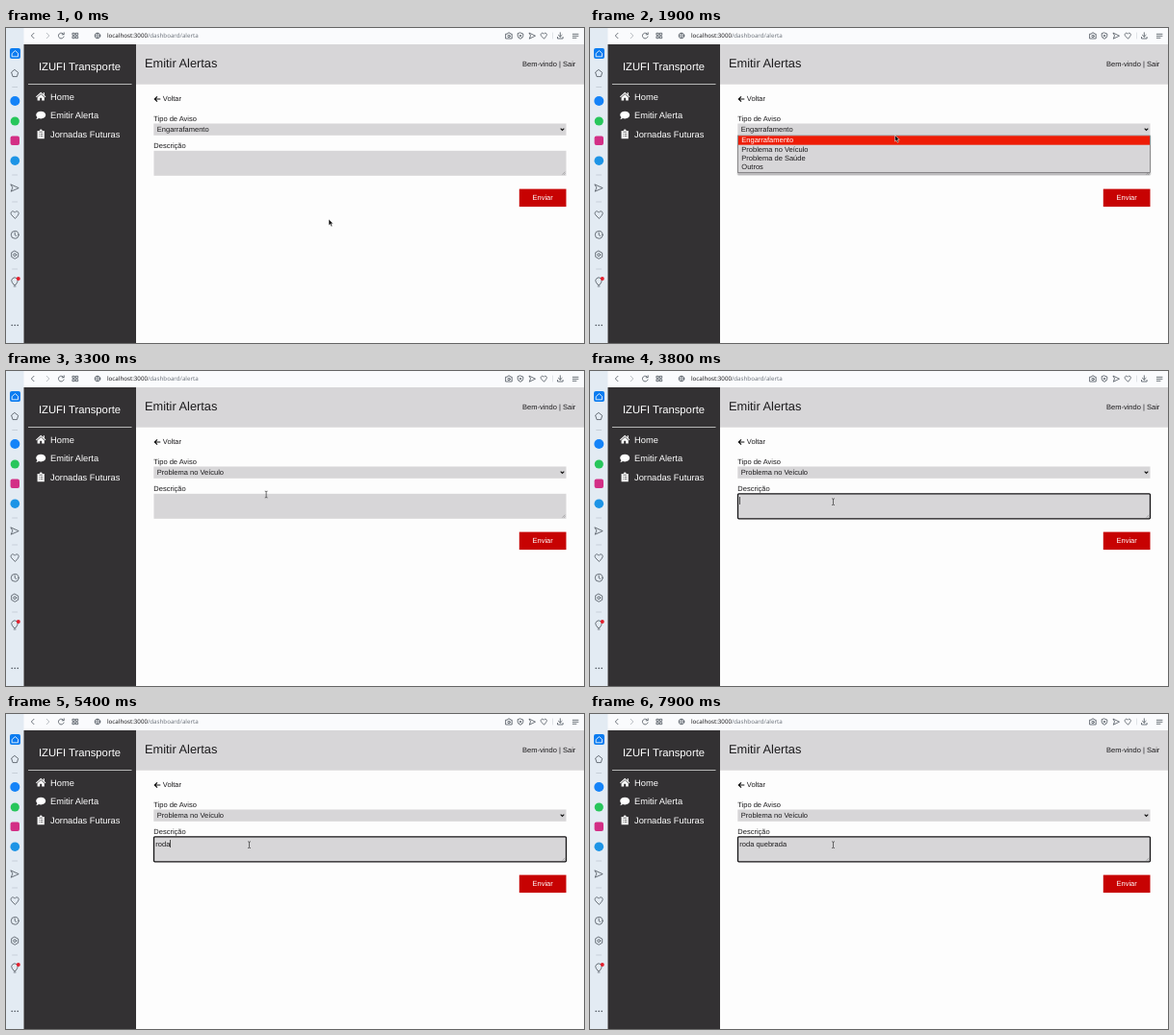
Animation, 600 px wide and 328 px high, one loop 8000 ms. Source, as an HTML page:

```html
<!DOCTYPE html>
<html lang="pt-BR">
<head>
<meta charset="utf-8">
<title>Emitir Alertas</title>
<style>
  html, body { margin: 0; width: 100%; height: 100%; overflow: hidden; background: #fdfdfd; }
  svg { display: block; }
  text { font: 7.5px "Liberation Sans", Arial, sans-serif; fill: #1c1b1d; white-space: pre; text-rendering: geometricPrecision; }
  .url { font: 6.2px "Noto Sans", sans-serif; }
  .title { font-size: 12.8px; }
  .brand { font-size: 11.25px; fill: #fff; text-anchor: middle; }
  .menu text { font-size: 9.3px; fill: #fff; }
  .line { fill: none; stroke: #4b525b; stroke-width: .8; stroke-linecap: round; stroke-linejoin: round; }
  .field { fill: #d7d6d8; }
</style>
</head>
<body>
<svg width="600" height="328" viewBox="0 0 600 328">
  <!-- browser toolbar -->
  <rect width="600" height="17" fill="#fafbfd"/>
  <g class="line">
    <path d="M29 5.3L26.3 8L29 10.7"/>
    <path d="M42.2 5.3L44.9 8L42.2 10.7" stroke="#a9aeb5"/>
    <path d="M59.8 6.5A2.9 2.9 0 1 0 60.1 9M60.2 4.8V6.8H58.2"/>
    <path d="M69.3 5.3h2v2h-2zM72.7 5.3h2v2h-2zM69.3 8.7h2v2h-2zM72.7 8.7h2v2h-2z"/>
    <circle cx="95" cy="8" r="2.8"/><path d="M92.2 8H97.8M95 5.2Q92.6 8 95 10.8Q97.4 8 95 5.2" stroke-width=".5"/>
    <path d="M519 6.2H520.5L521.2 5H523L523.7 6.2H525.2V11H519Z"/><circle cx="522.1" cy="8.5" r="1.2"/>
    <path d="M534 5L536.8 6V8.3Q536.5 10.3 534 11.3Q531.5 10.3 531.2 8.3V6Z"/><path d="M533 7.2L535 9.2M535 7.2L533 9.2"/>
    <path d="M543.3 5.2L549.5 8.2L543.3 11.2L544.4 8.2Z"/>
    <path d="M558.3 11L555.7 8.3C553.9 6.2 556.9 3.9 558.3 6.2C559.7 3.9 562.7 6.2 560.9 8.3Z"/>
    <path d="M567.5 5V11" stroke="#c9cdd2" stroke-width=".5"/>
    <path d="M575.3 4.8V9M573.5 7.4L575.3 9.1L577.1 7.4M572.5 9.5V11H578.1V9.5"/>
    <path d="M588.3 6.3H594M588.3 8.3H594M588.3 10.3H592"/>
  </g>
  <text class="url" x="105" y="10.3">localhost:3000<tspan fill="#70767e">/dashboard/alerta</tspan></text>

  <!-- browser sidebar -->
  <rect width="18.5" height="328" fill="#e3ebf3"/>
  <rect x="4" y="21" width="11" height="11" rx="2" fill="#0b7cf0"/>
  <path d="M6.5 26.3L9.5 23.6L12.5 26.3V29.8H6.5Z" class="line" style="stroke:#fff"/>
  <circle cx="9.3" cy="76" r="5" fill="#1483f8"/>
  <circle cx="9.3" cy="97" r="4.6" fill="#27c65b"/>
  <rect x="4.6" y="112.5" width="9.4" height="9.4" rx="2" fill="#d32f86"/>
  <circle cx="9.3" cy="138.2" r="4.8" fill="#1d94e6"/>
  <g class="line">
    <path d="M9.2 43.6L12.7 46.4L11.4 50.6H7L5.7 46.4Z"/>
    <path d="M6.7 61.5H11.7M6.7 153H11.7M6.7 181H11.7M6.7 251H11.7" stroke="#b4bdc7" stroke-width=".6"/>
    <path d="M5.2 163L13.2 166.6L5.2 170.2L6.7 166.6Z"/>
    <path d="M9.2 198.2L5.9 194.9C3.5 191.8 7.2 189.1 9.2 192.2C11.2 189.1 14.9 191.8 12.5 194.9Z"/>
    <circle cx="9.2" cy="215.3" r="3.9"/><path d="M9.2 213V215.5L10.8 216.5"/>
    <path d="M9.2 232.2L12.7 234.2V238.3L9.2 240.3L5.7 238.3V234.2Z"/><circle cx="9.2" cy="236.2" r="1.4"/>
    <path d="M8 267.2L6.3 264.8A3.2 3.2 0 1 1 11.7 264.8L10.2 267.2ZM8.2 269H10"/>
  </g>
  <circle cx="12.8" cy="261" r="2" fill="#e3202d"/>
  <g fill="#3c434b"><circle cx="6.2" cy="309.6" r=".75"/><circle cx="9.2" cy="309.6" r=".75"/><circle cx="12.2" cy="309.6" r=".75"/></g>

  <!-- page navigation -->
  <rect x="18.5" y="17" width="116.5" height="311" fill="#333133"/>
  <text class="brand" x="76.5" y="44">IZUFI Transporte</text>
  <path d="M23 58.5H130.5" stroke="#d8d8d8" stroke-width=".8"/>
  <g class="menu" fill="#fff">
    <path d="M31 71.6L36.2 66.8L41.4 71.6L40.7 72.3L36.2 68.2L31.7 72.3ZM32.6 72.3L36.2 69.1L39.8 72.3V75.6H37.2V72.8H35.2V75.6H32.6ZM38.7 67.2H39.9V70L38.7 69Z"/>
    <path d="M36.2 86.7C39 86.7 41.2 88.4 41.2 90.6S39 94.5 36.2 94.5Q35 94.5 34 94.1Q32.8 95.1 31.2 95.2Q32.2 94.1 32.4 93.1Q31.2 92 31.2 90.6C31.2 88.4 33.4 86.7 36.2 86.7Z"/>
    <path d="M32.6 107H34.7Q34.9 105.6 36.2 105.6T37.7 107H39.8V115.2H32.6Z"/>
    <path d="M34.4 108.2H38M34 110.4H34.7M35.6 110.4H38.4M34 112.4H34.7M35.6 112.4H38.4" stroke="#333133" stroke-width=".7"/>
    <text x="46" y="74.7">Home</text>
    <text x="46" y="94.2">Emitir Alerta</text>
    <text x="46" y="113.7">Jornadas Futuras</text>
  </g>

  <!-- form -->
  <rect class="field" x="135" y="17" width="465" height="41.7"/>
  <text class="title" x="144" y="41">Emitir Alertas</text>
  <text x="536" y="40.3">Bem-vindo | Sair</text>
  <path d="M160.3 74H154.6M157 71.3L154.3 74L157 76.7" fill="none" stroke="#111" stroke-width="1.2"/>
  <text x="162.8" y="76.2">Voltar</text>
  <text x="153.3" y="96.5">Tipo de Aviso</text>
  <rect class="field" x="153.3" y="99.5" width="428.2" height="12.3"/>
  <text id="choice" x="156.8" y="108.4"></text>
  <path d="M575.7 104.6L577.5 106.4L579.3 104.6" fill="none" stroke="#111" stroke-width="1.1"/>
  <text x="153.3" y="124.6">Descrição</text>
  <rect id="area" class="field" x="153.5" y="127.8" width="428" height="26"/>
  <path d="M577.5 152.7L580.5 149.7M579.3 152.7L580.5 151.5" stroke="#777" stroke-width=".5"/>
  <text id="typed" x="155.3" y="137.5"></text>
  <rect id="caret" y="131" width=".7" height="8" fill="#111"/>
  <rect x="532.8" y="167.6" width="48.7" height="18.5" fill="#c70202"/>
  <text x="557.1" y="179.3" text-anchor="middle" style="fill:#fff">Enviar</text>

  <g id="list">
    <rect x="152.5" y="112.5" width="430" height="40.5" rx="1" fill="#000" opacity=".13"/>
    <rect class="field" x="153.6" y="112" width="427.8" height="38.6" stroke="#6d6c6e" stroke-width=".7"/>
    <rect id="mark" x="154" width="427" height="9.4" fill="#ee1c06"/>
  </g>

  <path id="arrow" d="M0 0V6.6L1.5 5.3L2.6 7.8L3.8 7.2L2.7 4.8H4.7Z" fill="#111" stroke="#fff" stroke-width=".5"/>
  <path id="beam" d="M-1.4 -3.4Q0 -3.4 0 -2.6Q0 -3.4 1.4 -3.4M0 -2.6V2.6M-1.4 3.4Q0 3.4 0 2.6Q0 3.4 1.4 3.4" fill="none" stroke="#333" stroke-width=".7"/>
</svg>
<script>
const $ = id => document.getElementById(id);
const show = (id, on) => $(id).setAttribute('visibility', on ? 'visible' : 'hidden');
const LOOP = 8000, STEP = 100;
const OPEN = 1700, PICK = 3200, FOCUS = 3700, ROW = 9.4, TOP = 112.3;
const options = ['Engarrafamento', 'Problema no Veículo', 'Problema de Saúde', 'Outros'];
const message = 'roda quebrada';
const keyTimes = [4800, 4900, 5100, 5300, 5500, 5700, 5900, 6000, 6600, 6700, 6900, 7100, 7200];
// time, x, y
const path = [[0, 335, 199], [900, 332, 168], [1200, 323, 110], [1700, 323, 110],
  [2500, 297, 116], [2800, 283, 121.5], [3000, 278, 125.5], [3200, 276, 126], [3600, 252.5, 136.2], [LOOP, 252.5, 136.2]];

const optionTexts = options.map((label, i) => {
  const text = document.createElementNS('http://www.w3.org/2000/svg', 'text');
  text.setAttribute('x', 157.3);
  text.setAttribute('y', 119.2 + ROW * i);
  text.textContent = label;
  $('list').append(text);
  return text;
});

function pointer(t) {
  const i = path.findIndex(p => p[0] > t);
  const [t0, x0, y0] = path[i - 1], [t1, x1, y1] = path[i];
  const k = (t - t0) / (t1 - t0);
  return [x0 + (x1 - x0) * k, y0 + (y1 - y0) * k];
}

function draw(now) {
  const t = Math.floor(now % LOOP / STEP) * STEP;
  const [x, y] = pointer(t);

  const open = t >= OPEN && t < PICK;
  const row = y > TOP + ROW ? 1 : 0;
  show('list', open);
  $('mark').setAttribute('y', TOP + ROW * row);
  optionTexts.forEach((text, i) => text.style.fill = i === row ? '#fff' : '');
  $('choice').textContent = options[t < PICK ? 0 : 1];

  const focused = t >= FOCUS;
  $('area').setAttribute('stroke', focused ? '#161517' : 'none');
  $('area').setAttribute('stroke-width', 1.3);
  $('area').setAttribute('rx', focused ? 1 : 0);
  const typed = message.slice(0, keyTimes.filter(k => k <= t).length);
  $('typed').textContent = typed;
  $('caret').setAttribute('x', 155.2 + (typed ? $('typed').getComputedTextLength() : 0));
  show('caret', focused && t < 4300 || t >= keyTimes[0] && t < 7800);

  const overText = t >= PICK && y > 128 && y < 154;
  for (const id of ['arrow', 'beam']) $(id).setAttribute('transform', `translate(${x} ${y})`);
  show('arrow', !overText);
  show('beam', overText);
  requestAnimationFrame(draw);
}
requestAnimationFrame(draw);
</script>
</body>
</html>
```
